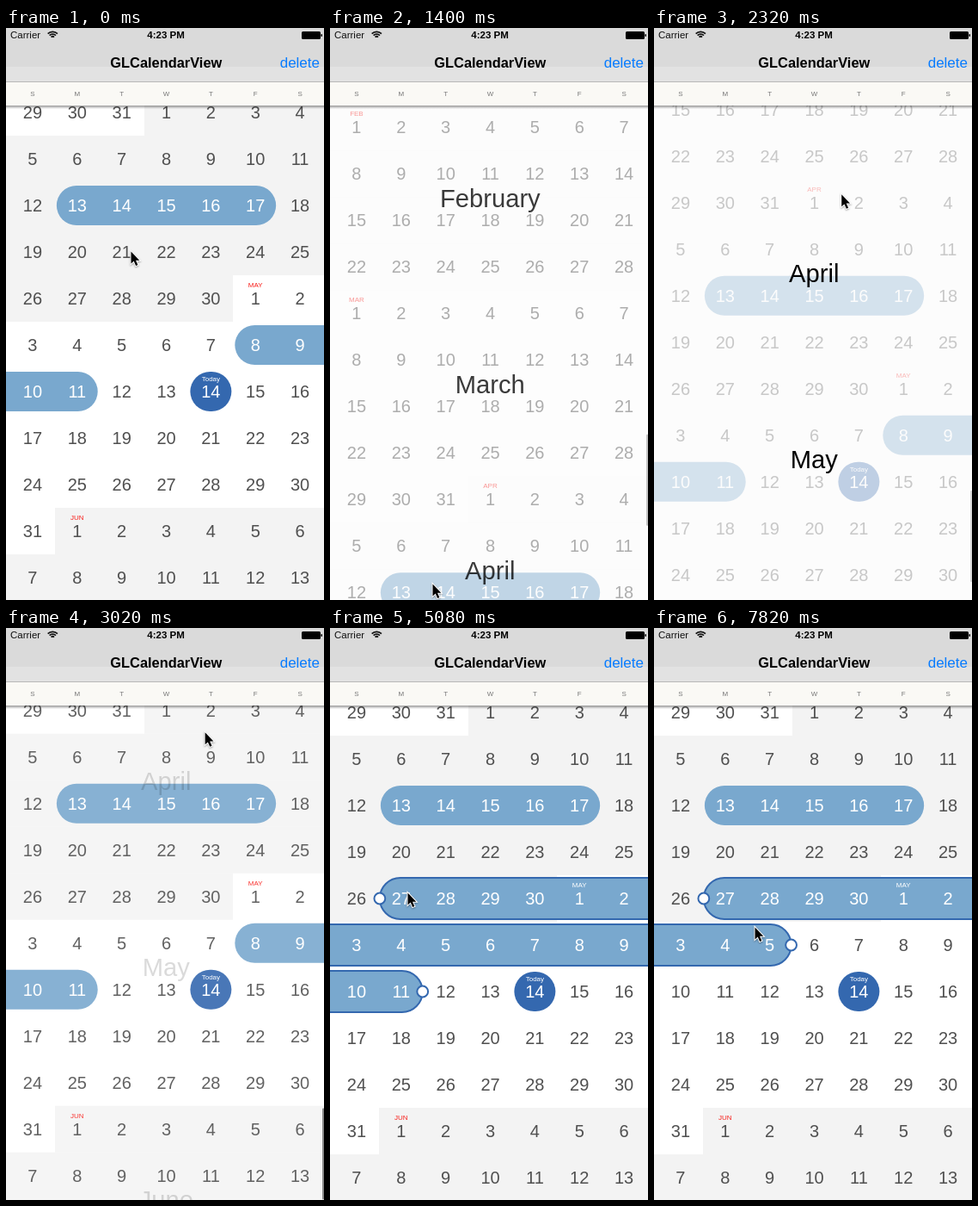
An HTML page with a canvas for the animation above (8 s loop, 370 by 664 pixels).

```html
<!DOCTYPE html>
<html lang="en">
<head>
<meta charset="utf-8">
<title>Calendar range picker</title>
<style>
  html, body { margin: 0; width: 370px; height: 664px; overflow: hidden; background: #fff; }
  canvas { display: block; }
</style>
</head>
<body>
<canvas id="stage" width="370" height="664"></canvas>
<script>
const ctx = document.getElementById('stage').getContext('2d');
const W = 370, H = 664, LOOP = 8000;
const CELL = 51.86, ROW = 54, LEFT = 5, TOP = 71, HEAD = 90;
const FONT = '"Liberation Sans", Arial, sans-serif';
const BLUE = '#79a8ce', DARK = '#3468af';
const MONTHS = ['January', 'February', 'March', 'April', 'May', 'June', 'July'];
const DAY_ZERO = Date.UTC(2015, 2, 29), TODAY = 46;

// Pointer gestures, each easing from wherever the last one ended.
const START = { x: 145, y: 259 };
const MOVES = [
  { from: 240, to: 600, x: 128, y: 195 },
  { from: 620, to: 1310, x: 119, y: 645 },
  { from: 1420, to: 1860, x: 205, y: 520 },
  { from: 1920, to: 2515, x: 222, y: 84 },
  { from: 2900, to: 3430, x: 291, y: 362 },
  { from: 4000, to: 4440, x: 85, y: 362 },
  { from: 4490, to: 4740, x: 90, y: 307 },
  { from: 5270, to: 5560, x: 86, y: 417 },
  { from: 5640, to: 6300, x: 327, y: 418 },
  { from: 6340, to: 7560, x: 117, y: 347 }
];
const SCROLLS = [{ press: 620, release: 1340 }, { press: 1920, release: 2790 }];
const BEGIN = { press: 4000, release: 5080 }, END = { press: 5640, release: 7820 };
const EDIT = 3700;

const clamp = p => Math.min(1, Math.max(0, p));
const smooth = p => clamp(p) ** 2 * (3 - 2 * clamp(p));
const mix = (a, b, p) => a + (b - a) * p;
const held = (t, drag) => t >= drag.press && t < drag.release;

const colX = c => LEFT + c * CELL;
const rowOf = d => Math.floor(d / 7);
const colOf = d => d - rowOf(d) * 7;
const midY = r => TOP + r * ROW + 27;
const inside = (d, range) => d >= range.from && d <= range.to;

function dateOf(d) {
  const date = new Date(DAY_ZERO + d * 864e5);
  return { num: date.getUTCDate(), month: date.getUTCMonth() };
}

function pointer(t) {
  return MOVES.reduce((pos, m) => {
    const p = smooth((t - m.from) / (m.to - m.from));
    return { x: mix(pos.x, m.x, p), y: mix(pos.y, m.y, p) };
  }, START);
}

// The list follows the pointer while held, then settles on the nearest row.
function scrollAt(t) {
  let offset = 0;
  for (const { press, release } of SCROLLS) {
    if (t < press) break;
    const pulled = offset + pointer(Math.min(t, release)).y - pointer(press).y;
    offset = mix(pulled, Math.round(pulled / ROW) * ROW, smooth((t - release) / 500));
  }
  return offset;
}

function shown(t, rise, wait, fall) {
  return Math.max(...SCROLLS.map(({ press, release }) =>
    clamp((t - press) / rise) * (1 - clamp((t - release - wait) / fall))));
}

function dayAt(t) {
  const { x, y } = pointer(t);
  return Math.floor((y - TOP) / ROW) * 7 + Math.min(6, Math.floor((x - LEFT) / CELL));
}

function rangesAt(t) {
  const edited = { from: 40, to: 43, edit: t >= EDIT, grip: '' };
  if (t >= BEGIN.press) edited.from = dayAt(Math.min(t, BEGIN.release));
  if (t >= END.press) edited.to = dayAt(Math.min(t, END.release));
  if (held(t, BEGIN)) edited.grip = 'from';
  if (held(t, END)) edited.grip = 'to';
  return [{ from: 15, to: 19, edit: false }, edited];
}

function text(str, x, y, size, color, weight = '', align = 'center') {
  ctx.font = `${weight} ${size}px ${FONT}`;
  ctx.textAlign = align;
  ctx.fillStyle = color;
  ctx.fillText(str, x, y);
}

function rect(x, y, w, h, color) {
  ctx.fillStyle = color;
  ctx.fillRect(x, y, w, h);
}

function round(x, y, w, h, r) {
  ctx.beginPath();
  ctx.roundRect(x, y, w, h, r);
}

function paint(fill, stroke, width) {
  ctx.fillStyle = fill;
  ctx.fill();
  if (!stroke) return;
  ctx.strokeStyle = stroke;
  ctx.lineWidth = width;
  ctx.stroke();
}

function knobAt(range, side) {
  const d = range[side];
  const x = side === 'to' ? colX(colOf(d) + 1) - 1 : colX(colOf(d)) + 1;
  return { x, y: midY(rowOf(d)) };
}

function drawRange({ from, to, edit }) {
  const pad = edit ? 1 : 2, half = edit ? 24 : 23;
  for (let r = rowOf(from); r <= rowOf(to); r++) {
    const x1 = r === rowOf(from) ? colX(colOf(from)) + pad : -60;
    const x2 = r === rowOf(to) ? colX(colOf(to) + 1) - pad : W + 60;
    round(x1, midY(r) - half, x2 - x1, half * 2, half);
    paint(BLUE, edit && DARK, 2);
  }
}

function drawKnob(range, side) {
  const { x, y } = knobAt(range, side);
  ctx.beginPath();
  ctx.arc(x, y, range.grip === side ? 8 : 6.4, 0, 7);
  paint('#fff', DARK, 2);
}

function drawDay(d, ranges) {
  const { num, month } = dateOf(d);
  const x = colX(colOf(d) + 0.5), y = midY(rowOf(d));
  const chosen = ranges.some(r => inside(d, r));
  if (d === TODAY && !chosen) {
    round(x - 24, y - 23, 48, 46, 23);
    paint(DARK);
  }
  text(num, x, y + 7, 20, chosen || d === TODAY ? '#fff' : '#505050');
  if (d === TODAY) text('Today', x, y - 12, 8, '#fff');
  else if (num === 1) {
    text(MONTHS[month].slice(0, 3).toUpperCase(), x, y - 13, 8, chosen ? '#fff' : '#f8201c');
  }
}

function visibleDays(offset) {
  const first = Math.floor((HEAD - offset - TOP) / ROW) - 2;
  return Array.from({ length: 14 * 7 }, (_, i) => first * 7 + i);
}

function drawGrid(offset, ranges, fade = 0) {
  const days = visibleDays(offset);
  const even = `rgb(243 243 243 / ${1 - fade})`;
  ctx.save();
  ctx.translate(0, offset);
  rect(0, -offset, W, H, '#fff');
  for (const d of days) {
    if (dateOf(d).month % 2 === 0) continue;
    const c = colOf(d);
    const x1 = c === 0 ? 0 : Math.round(colX(c));
    const x2 = c === 6 ? W : Math.round(colX(c + 1));
    rect(x1, TOP + rowOf(d) * ROW, x2 - x1, ROW, even);
  }
  ranges.forEach(drawRange);
  days.forEach(d => drawDay(d, ranges));
  for (const r of ranges.filter(r => r.edit)) {
    drawKnob(r, 'from');
    drawKnob(r, 'to');
  }
  ctx.restore();
}

function drawMonths(offset, fade) {
  ctx.globalAlpha = fade;
  rect(0, HEAD, W, H - HEAD, 'rgba(251,251,251,.7)');
  for (const d of visibleDays(offset)) {
    const { num, month } = dateOf(d);
    if (num === 1) text(MONTHS[month], 186.3, midY(rowOf(d)) + 92.5 + offset, 29.2, '#000');
  }
  ctx.globalAlpha = 1;
}

function drawLoupe({ x, y }, ranges) {
  const l = x - 49.5, t = y - 86.5, w = 99, h = 52;
  ctx.save();
  ctx.shadowColor = 'rgba(0,0,0,.6)';
  ctx.shadowBlur = 4;
  round(l, t, w, h, 4);
  ctx.moveTo(x - 11, t + h);
  ctx.lineTo(x, y - 23);
  ctx.lineTo(x + 11, t + h);
  paint('#fff');
  ctx.restore();
  round(l, t, w, h, 4);
  paint('#fff', '#777', 1);

  ctx.save();
  round(l + 2, t + 2, w - 4, h - 4, 2);
  ctx.clip();
  ctx.translate(0, -61);
  drawGrid(0, ranges);
  ctx.translate(0, 61);
  const gloss = ctx.createLinearGradient(l, t, l + 30, t + h);
  gloss.addColorStop(0, 'rgba(255,255,255,.3)');
  gloss.addColorStop(1, 'rgba(255,255,255,0)');
  rect(l, t, w, h, gloss);
  ctx.restore();
}

function drawHeader() {
  rect(0, 0, W, 45, '#dadada');
  rect(0, 45, W, 17, '#e2e2e2');
  rect(0, 62, W, 1, '#b8b8b8');
  rect(0, 63, W, 27, '#faf9f5');
  const shade = ctx.createLinearGradient(0, 90, 0, 94);
  shade.addColorStop(0, 'rgba(0,0,0,.4)');
  shade.addColorStop(1, 'rgba(0,0,0,0)');
  rect(0, 90, W, 4, shade);

  text('Carrier', 5, 12, 11.5, '#111', '', 'left');
  text('4:23 PM', 186, 12, 11.5, '#000', 'bold');
  for (const r of [2.4, 5.2, 8]) {
    ctx.beginPath();
    ctx.arc(54.3, 12.3, r, Math.PI * 1.25, Math.PI * 1.75);
    ctx.strokeStyle = '#111';
    ctx.lineWidth = 1.7;
    ctx.stroke();
  }
  round(344, 4, 22, 9, 1.5);
  ctx.roundRect(366.5, 7, 1.5, 3, 0.7);
  paint('#000');

  text('GLCalendarView', 186.3, 46, 16.4, '#000', 'bold');
  text('delete', 365, 46, 17, '#087cff', '', 'right');
  [...'SMTWTFS'].forEach((s, c) => text(s, colX(c + 0.5), 78.5, 8, '#777'));
}

function drawPointer({ x, y }) {
  ctx.save();
  ctx.translate(x + 0.5, y + 0.5);
  ctx.shadowColor = 'rgba(0,0,0,.35)';
  ctx.shadowBlur = 2;
  ctx.shadowOffsetY = 1;
  const arrow = new Path2D('M0 0V14L3.2 11.1 5.6 16.4 7.9 15.4 5.5 10.2H9.8Z');
  ctx.strokeStyle = '#fff';
  ctx.lineWidth = 2;
  ctx.stroke(arrow);
  ctx.shadowColor = 'transparent';
  ctx.fillStyle = '#000';
  ctx.fill(arrow);
  ctx.restore();
}

function draw(t) {
  const offset = scrollAt(t), fade = shown(t, 300, 0, 270);
  const ranges = rangesAt(t), edited = ranges[1];
  drawGrid(offset, ranges, fade);
  round(368, 557 - 0.19 * offset, 2.5, 106, 1);
  paint(`rgb(0 0 0 / ${0.5 * shown(t, 60, 350, 200)})`);
  drawMonths(offset, fade);
  if (edited.grip) drawLoupe(knobAt(edited, edited.grip), ranges);
  drawHeader();
  drawPointer(pointer(t));
}

const start = performance.now();
function tick() {
  draw((performance.now() - start) % LOOP);
  requestAnimationFrame(tick);
}
tick();
</script>
</body>
</html>
```
